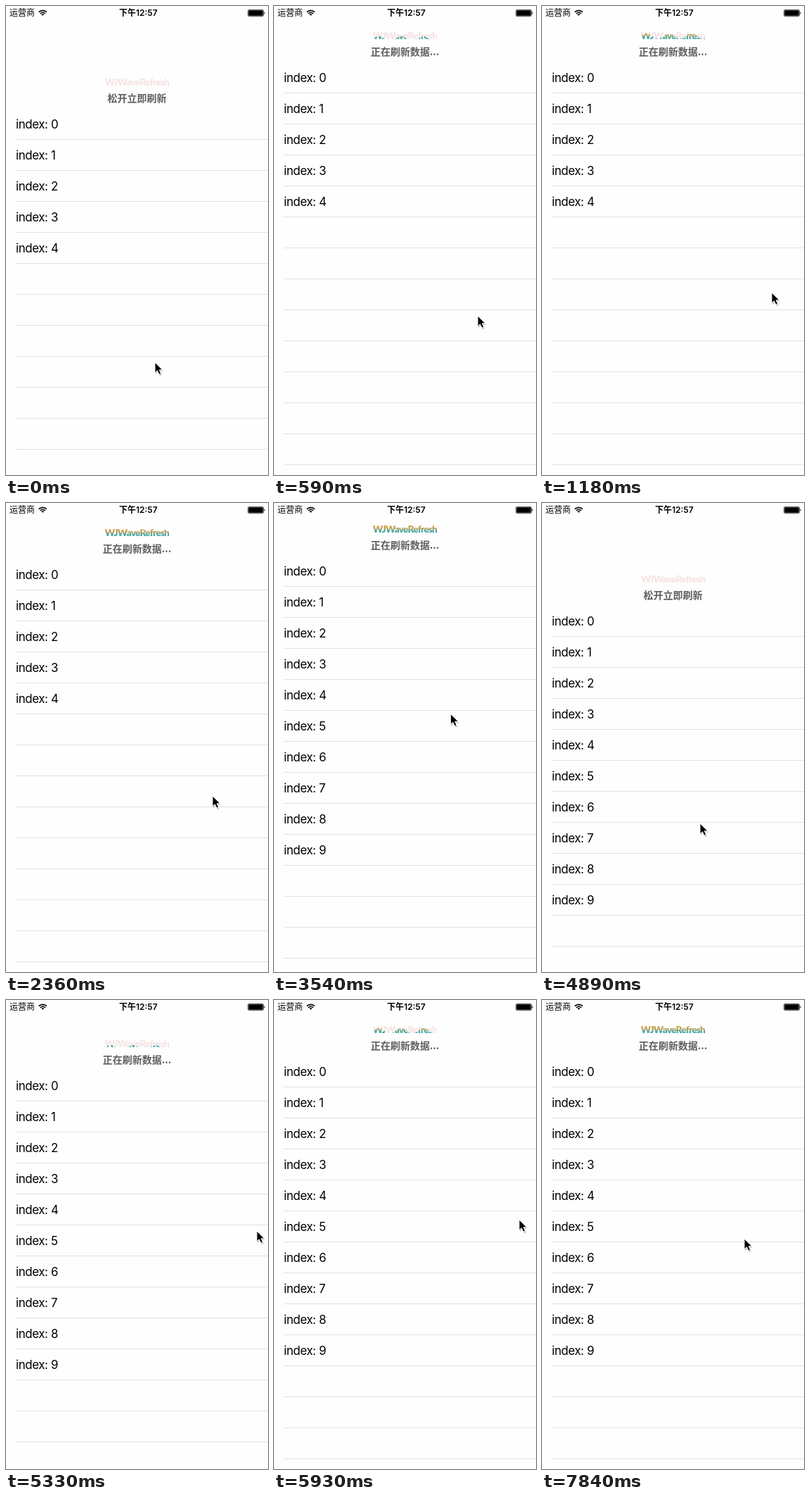
Recreate the animation shown at these times as an HTML page. Size 373 px wide and 666 px high, loop 7.99 s.

```html
<!DOCTYPE html>
<html lang="zh">
<head>
<meta charset="utf-8">
<title>Pull to refresh</title>
<style>
  html, body { margin: 0; width: 100%; height: 100%; overflow: hidden; background: #fefefe; }
  svg { display: block; width: 373px; height: 666px; }
  text { font-family: Inter, "Noto Sans CJK SC", "Noto Sans CJK", sans-serif; }
  .row { font-size: 16.9px; letter-spacing: -.4px; }
  .bar { font-size: 12px; }
  .label { font-size: 14px; font-weight: 600; fill: #5f5f5f; font-family: "Noto Sans CJK SC", "Noto Sans CJK", sans-serif; }
  .title { font: 900 13.5px Lato, sans-serif; letter-spacing: -.7px; }
  .mid { text-anchor: middle; }
</style>
</head>
<body>
<svg viewBox="0 0 373 666">
  <defs>
    <linearGradient id="paint" gradientUnits="userSpaceOnUse" x1="0" y1="-6" x2="0" y2="6">
      <stop offset=".15" stop-color="#d9a03c"/>
      <stop offset=".5" stop-color="#a3a673"/>
      <stop offset=".8" stop-color="#37a9a8"/>
    </linearGradient>
    <clipPath id="water"><path id="wave"/></clipPath>
  </defs>
  <g id="list">
    <g transform="translate(0 -18)">
      <text class="title mid" x="186.5" y="5.3" fill="#f5e5e5">WJWaveRefresh</text>
      <text class="title mid" x="186.5" y="5.3" fill="url(#paint)" clip-path="url(#water)">WJWaveRefresh</text>
    </g>
    <text id="label" class="label mid" x="186.5" y="10"></text>
    <g id="rows"></g>
  </g>
  <rect width="373" height="20" fill="#fefefe"/>
  <text class="bar" x="5" y="14.3">运营商</text>
  <g transform="translate(52.3 13.8)" fill="none" stroke="#000" stroke-width="1.7">
    <path d="M-5.6 -5.2A8 8 0 0 1 5.6 -5.2M-3.5 -3A5 5 0 0 1 3.5 -3"/>
    <path d="M0 0L-1.9 -1.9A2.7 2.7 0 0 1 1.9 -1.9Z" fill="#000" stroke="none"/>
  </g>
  <text class="bar mid" x="188.3" y="14.3" font-weight="600">下午12:57</text>
  <rect x="344.5" y="5.5" width="22" height="9" rx="1.5" fill="none" stroke="#000" stroke-width=".7"/>
  <rect x="345.3" y="6.3" width="20.4" height="7.4" rx=".8"/>
  <path d="M367.4 8.2a2 2 0 0 1 0 3.6z"/>
  <g id="cursor">
    <path d="M1 2V17L4.5 14L7 19.2L10 18L7.6 12.8H12Z" fill="#000" opacity=".22"/>
    <path d="M0 0V15L3.4 11.8L5.9 17.2L8.7 16L6.3 10.8H11Z" stroke="#fff"/>
  </g>
</svg>
<script>
const $ = id => document.getElementById(id);
const LOOP = 7990, STEP = 148, ROW = 44;
const RELEASES = [163, 5073], DONE = 3310, PULL = 4440;
const OPEN = 126, HOLD = 60;

// pointer path: step, x, y
const PATH = [
  [1, 212, 506], [4, 290, 440], [8, 327, 407], [9, 306, 411], [16, 294, 416],
  [18, 290, 410], [29, 205, 167], [30, 205, 167], [33, 225, 455], [34, 225, 455],
  [36, 357, 328], [40, 349, 312], [42, 332, 318], [50, 312, 322], [53, 288, 339]
];

let rows = '';
for (let i = 0; i < 15; i++) {
  const y = 20 + i * ROW;
  if (i < 10) rows += `<text class="row" x="14" y="${y + 28}">index: ${i}</text>`;
  rows += `<rect x="14" y="${y + 43}" width="359" height="1" fill="#e1e1e4"/>`;
}
$('rows').innerHTML = rows;
const extra = [...document.querySelectorAll('.row')].slice(5);

const mix = (a, b, k) => a + (b - a) * k;

function ease(t, start, length) {
  const k = Math.min(1, Math.max(0, (t - start) / length));
  return k * k * (3 - 2 * k);
}

function offsetAt(t) {
  if (t < DONE) return mix(OPEN, HOLD, ease(t, RELEASES[0], 400));
  if (t < PULL) return mix(HOLD, 0, ease(t, DONE, 540));
  if (t < RELEASES[1]) return OPEN * ease(t, PULL, 444);
  return mix(OPEN, HOLD, ease(t, RELEASES[1], 400));
}

function pointerAt(n) {
  if (n <= PATH[0][0]) return PATH[0].slice(1);
  const i = PATH.findIndex(p => p[0] >= n);
  if (i < 0) return PATH.at(-1).slice(1);
  const a = PATH[i - 1], b = PATH[i], k = (n - a[0]) / (b[0] - a[0]);
  return [mix(a[1], b[1], k), mix(a[2], b[2], k)];
}

function wavePath(level, t) {
  const crest = 181 + 32 * t / 592;
  let d = 'M130 20';
  for (let x = 130; x <= 246; x += 2)
    d += `L${x} ${level - 4 * Math.cos((x - crest) * Math.PI / 16)}`;
  return d + 'V20Z';
}

function draw(now) {
  const n = Math.floor((now % LOOP + 8) / STEP), t = n * STEP;
  const start = t < PULL ? RELEASES[0] : RELEASES[1];
  const busy = t >= start;
  $('list').setAttribute('transform', `translate(0 ${Math.round(offsetAt(t))})`);
  $('label').textContent = busy ? '正在刷新数据...' : '松开立即刷新';
  $('wave').setAttribute('d', wavePath(busy ? 7.8 - 7 * (t - start) / 1000 : 20, t));
  for (const e of extra) e.style.display = t >= DONE ? '' : 'none';
  $('cursor').setAttribute('transform', `translate(${pointerAt(n)})`);
}

const begin = performance.now();
function tick() {
  draw(performance.now() - begin);
  requestAnimationFrame(tick);
}
tick();
</script>
</body>
</html>
```
